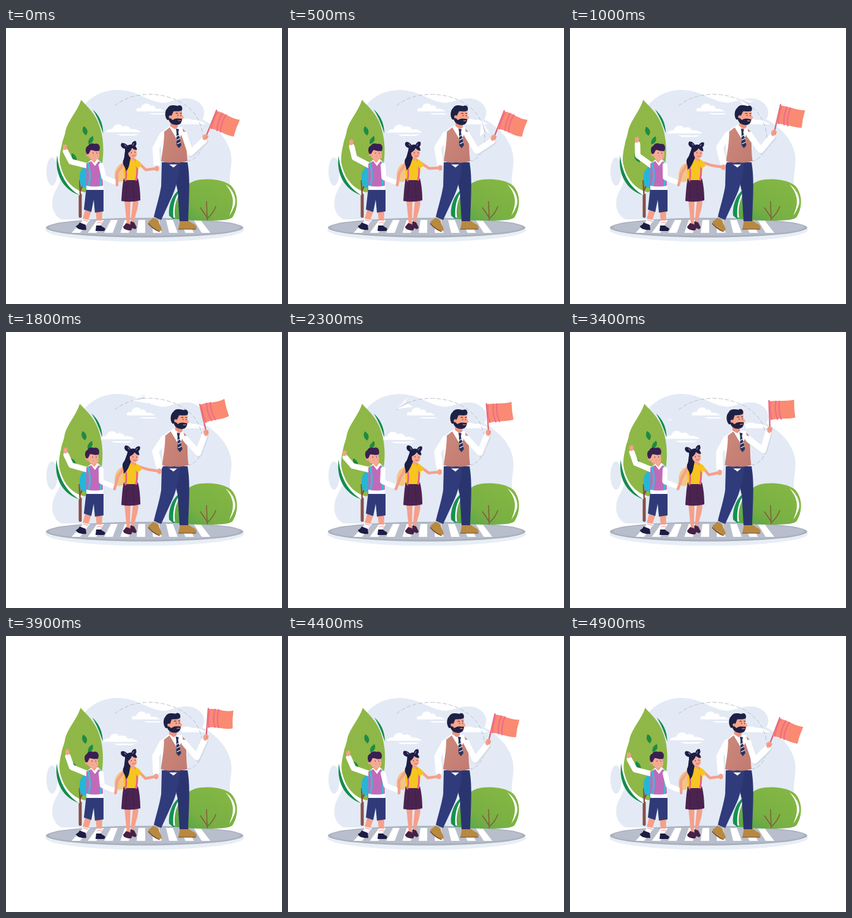
Recreate the animation shown at these times as an HTML page. Size 450x450 px, loop 5000 ms.

```html
<!DOCTYPE html>
<html lang="en">
<head>
<meta charset="utf-8">
<title>School crossing</title>
<style>
html, body { margin: 0; width: 100%; height: 100%; overflow: hidden; background: #fff; }
svg { display: block; width: 100%; height: 100%; }
.limb { fill: none; stroke-linecap: round; stroke-linejoin: round; }
.line { fill: none; stroke-linecap: round; }
</style>
</head>
<body>
<svg viewBox="0 0 450 450">
<defs>
  <linearGradient id="leaf" x1="0" y1="0" x2=".4" y2="1">
    <stop offset="0" stop-color="#90b748"/><stop offset="1" stop-color="#8db846"/>
  </linearGradient>
  <linearGradient id="shrub" x1=".9" y1="0" x2=".1" y2=".9">
    <stop offset="0" stop-color="#86b844"/><stop offset=".7" stop-color="#78b043"/><stop offset="1" stop-color="#5ca746"/>
  </linearGradient>
  <linearGradient id="vest" x1="0" y1="0" x2="1" y2="1">
    <stop offset="0" stop-color="#cc897c"/><stop offset="1" stop-color="#c27a70"/>
  </linearGradient>
</defs>

<g id="backdrop">
  <path fill="#e3eaf5" d="M90 312C73 302 71 281 83 261C100 232 96 190 108 160C121 122 148 101 182 101C214 101 234 122 258 122C274 119 288 112 304 116C321 121 328 137 320 149C340 159 363 181 367 207C370 226 362 240 366 262C370 290 372 303 360 314Z"/>
  <ellipse cx="75" cy="234" rx="9" ry="23" fill="#e3eaf5"/>
  <path fill="#fff" d="M286 150C293 146 300 148 304 150C312 149 321 153 326 157H286Z"/>
</g>
<g id="cloudA" fill="#fff"><path d="M-18 8C-20 3-14 1-11 3C-10-5 1-8 5-1C9-3 13 0 13 4C20 3 25 5 27 8Z"/><path d="M1 11H31L26 13H8Z"/></g>
<g id="cloudB" fill="#fff"><path d="M-20 9C-17 4-12 3-9 4C-6-6 5-6 8 0C14-3 20 0 21 4C28 3 34 5 38 9Z"/><path d="M-2 12H35L27 14.5H5Z"/></g>
<path class="line" stroke="#b9c0cc" stroke-width="1" stroke-dasharray="6 4" d="M177 127C190 116 207 110 222 109C255 104 298 120 312 147C328 175 322 212 297 217"/>
<path id="route" fill="none" d="M297 217C322 212 328 175 312 147C298 120 255 104 222 109C200 112 185 120 172 131L160 145"/>
<g id="plane">
  <path fill="#fff" d="M13 0L-12-9L-7 0Z"/><path fill="#c5cad8" d="M13 0L-7 0L-9 5Z"/><path fill="#f6f7fb" d="M13 0L-7 2L-11 9Z"/>
</g>

<ellipse cx="226" cy="329" rx="162" ry="19.5" fill="#e8eef5"/>
<ellipse cx="226" cy="325.5" rx="161" ry="16" fill="#a9afbd"/>
<ellipse cx="226" cy="325" rx="156" ry="13.5" fill="#b8becb"/>
<g id="zebra" fill="#fff"></g>

<path class="line" stroke="#85504a" stroke-width="5" d="M121 251L121 307"/>
<g id="tree">
  <path fill="#fff" d="M89 200C78 235 92 262 119 273L129 266Z"/>
  <path fill="url(#leaf)" d="M122 117C130 127 147 139 154 166C159 184 159 203 157 218C153 246 143 261 128 268C112 264 96 252 89 226C86 216 87 205 91 189C92 182 95 178 97 166C102 149 115 137 122 117Z"/>
  <path fill="#168b4d" d="M83 208C79 238 92 263 120 273C99 260 87 240 83 208ZM141 133C151 142 158 155 158 172C153 157 149 146 141 133Z"/>
  <g id="leaves" fill="#1f8a45">
    <path d="M126 160C133 164 134 170 130 175C124 171 123 166 126 160Z"/>
    <path d="M141 176C144 182 141 188 134 189C133 183 136 179 141 176Z"/>
    <path d="M107 204C114 207 116 213 115 218C108 216 105 211 107 204Z"/>
  </g>
  <path class="line" stroke="#85504a" stroke-width="2.5" d="M121 272L120 249M121 265L129 248"/>
</g>

<g id="bush">
  <path fill="#159250" d="M285 262C271 270 264 291 266 306L272 311H287Z"/>
  <path fill="#fff" d="M288 260C277 270 271 289 273 309L283 311Z"/>
  <path fill="url(#shrub)" d="M276 311C271 287 283 258 308 249C329 244 354 247 367 257C380 271 379 294 369 309C364 313 350 314 320 314C304 314 287 313 276 311Z"/>
  <path fill="#fff" d="M358 255C371 264 376 278 373 289C369 299 367 302 364 306C371 290 375 275 358 255Z"/>
  <path class="line" stroke="#86563f" stroke-width="1.4" d="M328 313L327 283M328 309Q322 300 317 293M329 310Q338 302 342 291"/>
</g>

<g id="boy">
  <path fill="#f4a08b" d="M129 296H140L132 320H123ZM146 297H157L156 324H149Z"/>
  <path fill="#fff" d="M125 311L135 313L131 321H122ZM148 314H156L155 325H149Z"/>
  <path class="line" stroke="#e58aa0" stroke-width="1" d="M126 313L134 315M149 317H155"/>
  <path fill="#1d1c45" d="M120 317L130 321L131 329C124 330 115 328 114 323C117 321 119 320 120 317ZM147 322H155C157 325 161 325 162 328L160 331H146Z"/>
  <path fill="#2f3b78" d="M131 260H159L159 299L145 301L143 280L139 300L127 296Z"/>
  <path fill="#27b5d6" d="M132 226C123 227 119 235 120 247C120 257 124 261 132 260Z"/>
  <path id="boyArm" class="limb" stroke="#fff" stroke-width="9"/>
  <path fill="#fff" d="M131 221L140 214H150L158 222L159 264H131Z"/>
  <path fill="#c16ab9" d="M131 221L139 217L145 225L151 217L157 222L158 257Q145 260 131 257Z"/>
  <path class="line" stroke="#36bfd9" stroke-width="3" d="M134 221Q139 240 135 256M153 220Q157 240 154 256"/>
  <path fill="#f4a08b" d="M139 207H148V215L144 220L139 215Z"/>
  <g id="boyHead">
    <path fill="#f7aa93" d="M133 199H151L152 206C153 212 149 216 143 215C137 215 133 210 133 199Z"/>
    <circle cx="133" cy="207" r="2.5" fill="#f4a08b"/>
    <path fill="#392052" d="M132 206C129 201 129 194 134 192C136 187 142 188 145 189C151 187 155 193 152 200C146 202 142 199 138 199L135 205Z"/>
    <path class="line" stroke="#392052" stroke-width=".9" d="M142 203.500V204.500M148 203.500V204.500"/>
    <path fill="#fff" stroke="#ca655f" stroke-width=".5" d="M143 209Q147 212 150 208Q147 209 143 209Z"/>
  </g>
  <path id="boyLink" class="limb" stroke="#fff" stroke-width="8"/>
</g>
<ellipse id="boyPalm" rx="3.2" ry="4" fill="#f4a08b"/>
<path id="boyFingers" class="line" stroke="#f4a08b" stroke-width="2"/>

<g id="girl">
  <path fill="#f3c583" d="M192 220C182 221 177 231 177 241C177 251 183 253 192 249Z"/>
  <path id="girlLink" class="limb" stroke="#f4a08b" stroke-width="4.5"/>
  <path fill="#f4a08b" d="M193 280H203L202 321H197ZM207 280H216C216 294 211 303 208 320H203Z"/>
  <path fill="#482044" d="M196 318L202 320L206 326L204 330C197 330 191 328 191 324ZM203 315L209 317L213 325L211 328C205 327 201 323 203 315Z"/>
  <path fill="#4b2350" d="M192 245H215C218 256 219 270 219 281Q203 285 188 282C189 267 190 254 192 245Z"/>
  <path class="line" stroke="#3b1d45" stroke-width=".8" d="M197 256L195 278M207 253L209 279"/>
  <path fill="#f7c51f" d="M191 217Q195 212 205 212Q214 213 217 221L214 248H193L191 232Z"/>
  <path class="line" stroke="#e65a8d" stroke-width="2.500" d="M193 218Q198 231 195 249M211 215Q216 231 212 248"/>
  <path id="girlArm" class="limb" stroke="#f4a08b" stroke-width="4.5"/>
  <path fill="#f7c51f" d="M211 214Q220 217 221 225L214 229L210 222Z"/>
  <path fill="#f4a08b" d="M203 206H210V213L206 217L203 213Z"/>
  <g id="girlHead">
    <path fill="#1d1d46" d="M198 196C194 202 195 209 191 214C188 221 194 225 193 232C199 228 200 221 202 216C205 210 203 202 208 197Z"/>
    <path fill="#1d1d46" d="M198 196C192 195 189 190 192 186C196 185 200 188 202 192ZM208 191C209 187 213 184 216 186C217 190 216 193 212 195Z"/>
    <path fill="#f7aa93" d="M201 197H214L215 204C215 211 210 214 205 212C201 210 200 205 201 197Z"/>
    <path fill="#1d1d46" d="M199 208C195 201 195 194 201 191C208 188 216 192 216 200C212 200 210 198 208 196C206 200 203 202 201 203Z"/>
    <path class="line" stroke="#34204b" stroke-width=".9" d="M206 203V204M212 203V204"/>
    <path class="line" stroke="#c95560" stroke-width=".9" d="M207 208.500Q210 210 212 208"/>
    <path class="line" stroke="#8e91b3" stroke-width="1" d="M199 192L197 189M210 192L212 189"/>
  </g>
</g>

<g id="man">
  <path fill="#b8893f" d="M240 309L249 314C249 320 254 325 254 329L250 332C242 330 234 323 232 318C233 313 237 314 240 309ZM284 313H297C300 318 310 319 311 325L309 328H281Z"/>
  <path class="line" stroke="#6d4636" stroke-width="1.2" d="M232 319Q240 328 250 332M281 328H310"/>
  <path fill="#2a3570" d="M269 219H296C300 242 299 265 297 315H283L280 266Z"/>
  <path fill="#303b7c" d="M254 219H284C282 243 276 264 270 276L253 313L241 308C245 291 250 276 253 258Z"/>
  <path id="manLink" class="limb" stroke="#fff" stroke-width="11"/>
  <g id="torso">
    <path fill="#fff" d="M252 172L265 161H283L295 170V218H254Z"/>
    <path fill="url(#vest)" d="M258 169L267 162L280 181L288 164L293 169C295 185 294 204 296 217Q282 221 273 219Q262 221 253 217C255 201 258 187 258 169Z"/>
    <path fill="#fff" d="M267 162L271 157L280 163L287 161L289 169L280 184Z"/>
    <path fill="#29345f" d="M277 164L282 165L281 170L286 191L282 196L278 191L278 170Z"/>
    <path stroke="#fff" stroke-width="1.2" d="M278 177L283 174M278 183L284 180M279 189L285 186"/>
  </g>
  <path fill="#fff" d="M266 222.500L279 222.500L273 227.500Z"/>
  <g id="manHead">
    <path fill="#ed917e" d="M268 149H280V162L275 165L268 160Z"/>
    <path fill="#f7a58e" d="M266 134H287L287 141L290 146L287 149C287 154 281 157 275 156C269 154 265 147 266 134Z"/>
    <path fill="#1d2245" d="M264 143C268 145 269 149 272 150C277 146 282 148 287 148C287 154 284 158 278 158C270 158 264 153 264 143Z"/>
    <path fill="#1d2245" d="M263 150C258 145 259 134 263 131C267 124 274 126 280 127C284 124 289 128 287 134C281 137 277 135 273 136L270 143L267 149Z"/>
    <circle cx="268" cy="145" r="2.500" fill="#f19c87"/>
    <path class="line" stroke="#1d2245" stroke-width="1" d="M277 139L280 139M284 139L286 139M280 142V143M285 142V143"/>
    <path class="line" stroke="#e0857a" stroke-width="1.2" d="M281 151H285"/>
  </g>
  <g id="flag">
    <path class="line" stroke="#dd5f78" stroke-width="2.2" d="M0 5L0-46"/>
    <path id="cloth" fill="#fa8a72"/>
    <path id="bands" class="line" stroke="#ee6c8d" stroke-width="2.200"/>
  </g>
  <path id="manShade" class="limb" stroke="#d3dae6" stroke-width="10"/>
  <path id="manArm" class="limb" stroke="#fff" stroke-width="10"/>
  <g id="manPalm" fill="#f4a08b"><path d="M-4 5C-6 0-4-4 0-4L4-2L3 4L-1 7Z"/><path class="line" stroke="#df816f" stroke-width=".7" d="M-1-1L3 0M-1 2L3 2"/></g>
</g>
<ellipse id="linkPalm" rx="3.5" ry="4.5" fill="#f4a08b"/>
</svg>
<script>
const LOOP = 5000;
const $ = id => document.getElementById(id);
const set = (id, name, value) => $(id).setAttribute(name, value);
const move = (id, value) => set(id, "transform", value);

const beats = [0, 500, 1000, 1800, 2700, 3400, 4400];
const pose = {
  flagX: [326, 336, 333, 326.5, 328, 326, 327],
  flagY: [177, 178, 170, 163, 163, 158, 172],
  flagTurn: [22, 21, 13, -13, 4, -2, 13],
  waveX: [96, 103, 109, 97, 91, 100, 98],
  waveY: [195, 187, 183, 194, 199, 190, 192],
  manX: [0, 5, 8, 8, 1, -3, 0],
  manTurn: [0, 2, 3, 3, 0, -4, -1],
  girlTurn: [-8, 0, 5, 5, 4, -8, -7],
  boyX: [0, 1, 2, -1, -6, -4, 0],
  linkX: [246, 248, 250, 250, 245, 244, 246],
  linkY: [229, 228, 227, 227, 229, 229, 229],
  kidsX: [181, 178, 177, 177, 175, 176, 181],
  treeTurn: [0.2, -0.4, -0.8, -0.5, -0.3, -0.2, 0]
};

// Smooth periodic curve through the poses
function sample(values, t) {
  const n = beats.length;
  const at = i => beats[(i + n) % n] + Math.floor(i / n) * LOOP;
  const val = i => values[(i + n) % n];
  let i = n - 1;
  while (beats[i] > t) i--;
  const span = at(i + 1) - at(i), u = (t - at(i)) / span;
  const slope = k => (val(k + 1) - val(k - 1)) / (at(k + 1) - at(k - 1)) * span;
  const a = val(i), b = val(i + 1), u2 = u * u, u3 = u2 * u;
  return a * (2 * u3 - 3 * u2 + 1) + slope(i) * (u3 - 2 * u2 + u) +
    b * (3 * u2 - 2 * u3) + slope(i + 1) * (u3 - u2);
}

function elbow([ax, ay], [bx, by], upper, lower, side) {
  const dx = bx - ax, dy = by - ay, d = Math.hypot(dx, dy);
  const along = (d * d + upper * upper - lower * lower) / (2 * d);
  const out = side * Math.sqrt(Math.max(0, upper * upper - along * along));
  return [ax + (dx * along - dy * out) / d, ay + (dy * along + dx * out) / d];
}

function limb(id, from, to, upper, lower, side) {
  const path = `M${from}L${elbow(from, to, upper, lower, side)}L${to}`;
  set(id, "d", path);
  return path;
}

function drawZebra() {
  let d = "";
  for (let k = -4; k <= 4; k++) {
    const top = 221 + k * 22.5, low = 220 + k * 26.5;
    d += `M${top - 5} 313H${top + 6}L${low + 7} 334H${low - 7}Z`;
  }
  $("zebra").innerHTML = `<path d="${d}"/>`;
}

function drawFlag(t, x, y, turn) {
  const w = 1.4 * Math.sin(t / LOOP * Math.PI * 8);
  move("flag", `translate(${x} ${y}) rotate(${turn})`);
  set("cloth", "d", `M0-45C12 ${-48 - w} 27 ${-42 + w} 41-46Q40-31 42-17C28 ${-13 + w} 13 ${-19 - w} 0-14Z`);
  set("bands", "d", `M2-44Q0-30 3-16M11 ${-45 - w / 2}Q8-30 13 ${-16 - w / 2}M17 ${-45 - w / 2}Q14-30 19 ${-16 - w / 2}`);
}

function drawPlane(t) {
  const u = Math.min(1, t / 3750), route = $("route"), total = route.getTotalLength();
  const s = total * (1 - (1 - u) ** 2);
  const p = route.getPointAtLength(s), q = route.getPointAtLength(Math.max(0, s - 3));
  const turn = s > 3 ? Math.atan2(p.y - q.y, p.x - q.x) * 180 / Math.PI : 0;
  const size = Math.min(1, t / 500, Math.max(0, (3750 - t) / 1050));
  move("plane", `translate(${p.x} ${p.y}) rotate(${turn}) scale(${size})`);
}

function draw(t) {
  const v = {};
  for (const name in pose) v[name] = sample(pose[name], t);
  const drift = (1 - Math.cos(t / LOOP * Math.PI * 2)) / 2;
  move("cloudA", `translate(${231 - 19 * drift} 128)`);
  move("cloudB", `translate(${182 - 12 * drift} ${161 + 6 * drift})`);
  move("tree", `rotate(${v.treeTurn} 122 300)`);
  move("leaves", `translate(0 ${2 * drift})`);
  drawPlane(t);

  const wave = [v.waveX, v.waveY], kids = [v.kidsX, 256], link = [v.linkX, v.linkY];
  limb("boyArm", [134, 225], [wave[0] + 1, wave[1] + 6], 29, 19, -1);
  limb("boyLink", [155, 224], [kids[0] - 4, kids[1] - 5], 20, 19, 1);
  limb("girlLink", [193, 220], kids, 20, 20, 1);
  limb("girlArm", [215, 219], link, 18, 18, 1);
  move("boyPalm", `translate(${wave})`);
  set("boyFingers", "d", `M${wave}l-2-4M${wave}l1-5M${wave}l3-3`);
  move("boyHead", `translate(${v.boyX * 0.7} 0) rotate(${v.boyX} 143 216)`);
  move("girlHead", `rotate(${v.girlTurn} 205 215)`);

  const lean = v.manX * 0.2, hand = [v.flagX, v.flagY];
  move("torso", `translate(${lean} 0)`);
  move("manHead", `translate(${v.manX} 0) rotate(${v.manTurn} 274 158)`);
  limb("manLink", [256 + lean, 174], [link[0], link[1] - 8], 25, 25, 1);
  const cuff = [hand[0] - 3, hand[1] + 6], shoulder = [291 + lean, 174];
  set("manShade", "d", limb("manArm", shoulder, cuff, 31, 30, 1));
  move("manShade", "translate(1.5 2)");
  drawFlag(t, ...hand, v.flagTurn);
  move("manPalm", `translate(${hand}) rotate(${v.flagTurn})`);
  move("linkPalm", `translate(${link})`);
}

drawZebra();
const start = performance.now();
function tick() {
  draw((performance.now() - start) % LOOP);
  requestAnimationFrame(tick);
}
tick();
</script>
</body>
</html>
```
